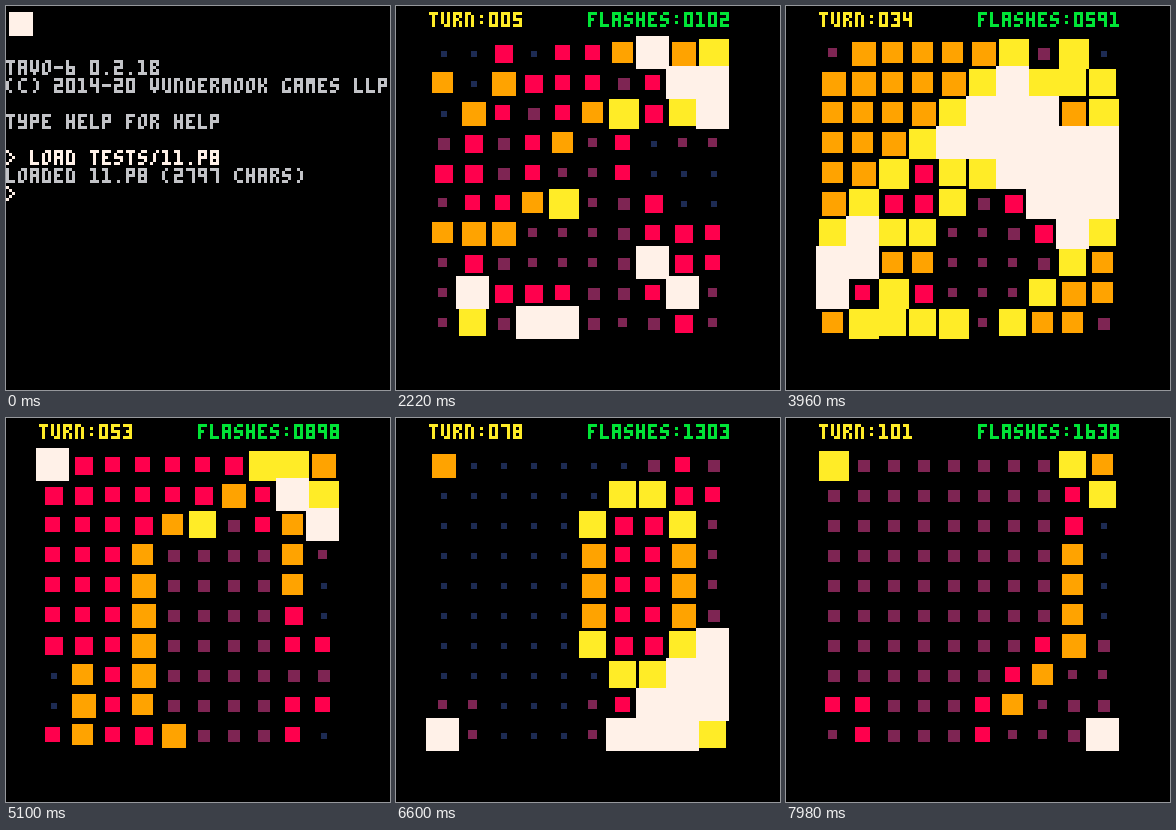
An HTML page with a canvas for the animation above (8 s loop, 384 by 384 pixels).

```html
<!DOCTYPE html>
<html lang="en">
<head>
<meta charset="utf-8">
<title>Octopus flashes</title>
<style>
  html, body { margin: 0; width: 100%; height: 100%; overflow: hidden; background: #000; }
  canvas { display: block; }
</style>
</head>
<body>
<canvas id="stage" width="384" height="384" aria-label="Console, then a grid of flashing squares with turn and flash counters"></canvas>
<script>
const ctx = document.getElementById('stage').getContext('2d');
ctx.scale(3, 3); // 128 x 128 logical pixels

const BLACK = '#000000', NAVY = '#1D2B53', PLUM = '#7E2553', GREY = '#C2C3C7', WHITE = '#FFF1E8',
      RED = '#FF004D', ORANGE = '#FFA300', YELLOW = '#FFEC27', GREEN = '#00E436';

// Pen strokes on a 3 x 5 grid, as xy pairs
const GLYPHS = {
  A: '04002024 0222', B: '0004 0020 21 0212 23 0424', C: '2010 0103 1424', D: '001021240400',
  E: '20000424 0212', F: '200004 0212', G: '2010010424 23', H: '0004 2024 0222',
  K: '0004 2021 0212 2324', L: '000424', M: '04002024 11', N: '0400102124',
  O: '20100104142320', P: '0400202202', R: '04002021 0212 2324', S: '2010010222231404',
  T: '0020 1014', U: '0003142420', V: '00032320 14', Y: '000222 202404',
  0: '0004242000', 1: '001014 0424', 2: '002022020424', 3: '00202404 1222', 4: '000222 2024',
  5: '200002222404', 6: '0004242202', 7: '002024', 8: '0004242000 0222', 9: '2420000222',
  ':': '11 13', '.': '14', '-': '0222', '/': '20 1113 04', '>': '002204',
  '(': '10010314', ')': '10212314', ' ': ''
};

function box(x, y, w, h, color) {
  ctx.fillStyle = color;
  ctx.fillRect(x, y, w, h);
}

function stroke(points, ox, oy, color) {
  let [x, y] = points[0];
  box(ox + x, oy + y, 1, 1, color);
  for (const [tx, ty] of points) {
    while (x !== tx || y !== ty) {
      x += Math.sign(tx - x);
      y += Math.sign(ty - y);
      box(ox + x, oy + y, 1, 1, color);
    }
  }
}

function print(text, x, y, color) {
  for (const ch of text) {
    for (const path of GLYPHS[ch].split(' ').filter(Boolean)) {
      stroke(path.match(/../g).map(p => [+p[0], +p[1]]), x, y, color);
    }
    x += 4;
  }
}

// Energy levels at turn 0
const START = [
  '4251567181', '6165552212', '1658567461', '3558623134', '7585134134',
  '2546734513', '7662333346', '1223473835', '2845573272', '4721154453'
];
const SIZE = 10, LAST_TURN = 101;

function step(grid) {
  const next = grid.map(row => row.map(v => v + 1));
  const fired = new Set();
  let flashes = 0;
  const flash = (r, c) => {
    const key = r * SIZE + c;
    if (next[r][c] < 10 || fired.has(key)) return;
    fired.add(key);
    flashes++;
    for (let y = Math.max(0, r - 1); y <= Math.min(SIZE - 1, r + 1); y++) {
      for (let x = Math.max(0, c - 1); x <= Math.min(SIZE - 1, c + 1); x++) {
        next[y][x]++;
        flash(y, x);
      }
    }
  };
  for (let r = 0; r < SIZE; r++) for (let c = 0; c < SIZE; c++) flash(r, c);
  return { grid: next.map(row => row.map(v => v > 9 ? 0 : v)), flashes };
}

const turns = [{ grid: START.map(row => [...row].map(Number)), total: 0 }];
for (let i = 0; i < LAST_TURN; i++) {
  const { grid, flashes } = step(turns[i].grid);
  turns.push({ grid, total: turns[i].total + flashes });
}

const LEVEL_COLORS = [WHITE, NAVY, PLUM, PLUM, RED, RED, ORANGE, ORANGE, YELLOW, YELLOW];

function drawGrid(turn) {
  const { grid, total } = turns[turn];
  print('TURN:' + String(turn).padStart(3, '0'), 11, 2, YELLOW);
  print('FLASHES:' + String(total).padStart(4, '0'), 64, 2, GREEN);
  grid.forEach((row, r) => row.forEach((v, c) => {
    const level = v || 10, half = level >> 1;
    box(15 + c * 10 - half, 15 + r * 10 - half, level + 1, level + 1, LEVEL_COLORS[v]);
  }));
}

const BLINKS = [30, 270, 480, 720, 960, 1200, 1410, 1650];

function drawConsole(t) {
  box(1, 2, 8, 8, WHITE);
  print('TAVO-6 0.2.1B', 0, 18, GREY);
  print('(C) 2014-20 VUNDERMOOK GAMES LLP', 0, 24, GREY);
  print('TYPE HELP FOR HELP', 0, 36, GREY);
  print('> LOAD TESTS/11.P8', 0, 48, WHITE);
  print('LOADED 11.P8 (2797 CHARS)', 0, 54, GREY);
  print('>', 0, 60, WHITE);
  if (BLINKS.filter(b => b <= t).length % 2) box(8, 60, 4, 5, RED);
}

const LOOP = 8000, RUN_AT = 1890, FIRST_TURN = 1920, TURN_MS = 60;
const began = performance.now();

function frame(now) {
  const t = Math.max(0, now - began) % LOOP;
  box(0, 0, 128, 128, BLACK);
  if (t < RUN_AT) drawConsole(t);
  else drawGrid(Math.max(0, Math.floor((t - FIRST_TURN) / TURN_MS)));
  requestAnimationFrame(frame);
}
frame(began);
</script>
</body>
</html>
```
